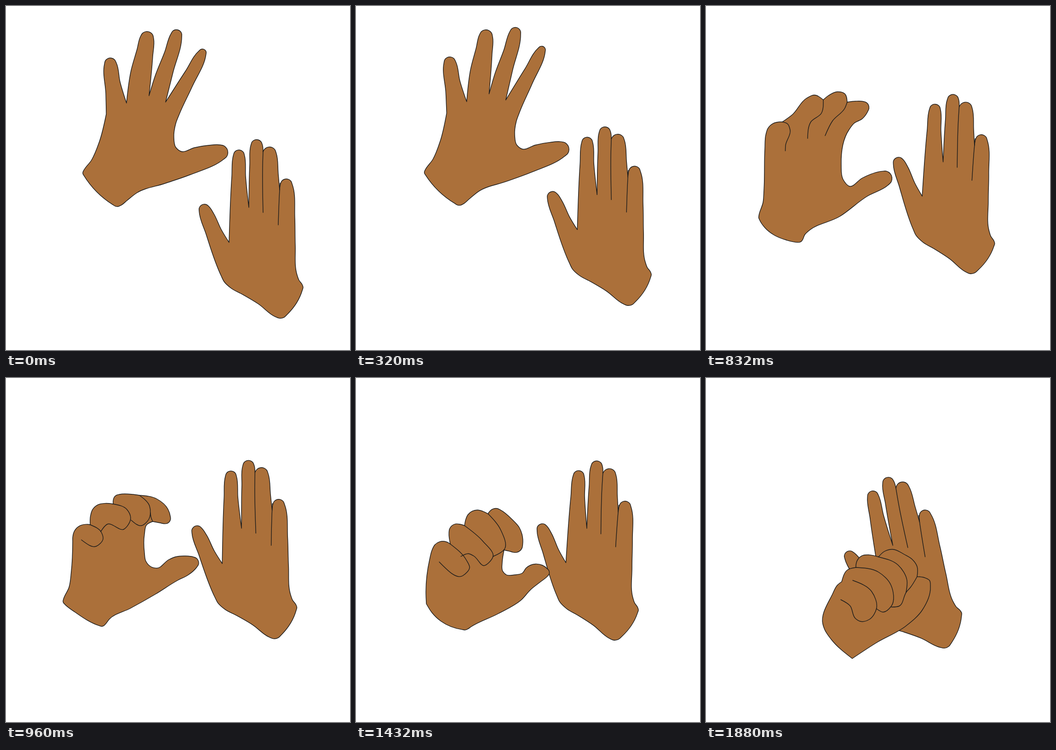
An HTML page with a canvas for the animation above (2.16 s loop, 748x748 px).

```html
<!DOCTYPE html>
<html lang="en">
<head>
<meta charset="utf-8">
<title>Two hands</title>
<style>
  html, body { margin: 0; width: 100%; height: 100%; overflow: hidden; background: #fff; }
  canvas { display: block; width: 100vw; height: 100vh; }
</style>
</head>
<body>
<canvas id="stage" width="748" height="748"></canvas>
<script>
const SKIN = '#ab703a', INK = '#1b1b1b';
const ctx = document.getElementById('stage').getContext('2d');

// Adds a smooth curve through the points, spaced by chord length.
function spline(path, pts) {
  const n = pts.length - 1, len = [], dir = [], tan = [];
  for (let i = 0; i < n; i++) {
    const dx = pts[i + 1][0] - pts[i][0], dy = pts[i + 1][1] - pts[i][1];
    len[i] = Math.hypot(dx, dy) || 1;
    dir[i] = [dx / len[i], dy / len[i]];
  }
  for (let i = 1; i < n; i++) {
    const w = len[i] / (len[i - 1] + len[i]);
    tan[i] = [0, 1].map(k => dir[i - 1][k] * w + dir[i][k] * (1 - w));
  }
  const end = (d, t) => t ? [0, 1].map(k => 1.5 * d[k] - 0.5 * t[k]) : d;
  tan[0] = end(dir[0], tan[1]);
  tan[n] = end(dir[n - 1], n > 1 ? tan[n - 1] : null);
  for (let i = 0; i < n; i++) {
    const h = len[i] / 3, [a, b] = [pts[i], pts[i + 1]], [s, t] = [tan[i], tan[i + 1]];
    path.bezierCurveTo(a[0] + s[0] * h, a[1] + s[1] * h, b[0] - t[0] * h, b[1] - t[1] * h, b[0], b[1]);
  }
}

// Angle on circle c where a line to q (a point or another circle) touches it.
function touch(c, q, side) {
  const dx = q[0] - c[0], dy = q[1] - c[1];
  const reach = (c[2] - (q[2] || 0)) / Math.hypot(dx, dy);
  return Math.atan2(dy, dx) + side * Math.acos(Math.min(1, reach));
}

// Clockwise arc of a round tip, fitted to its neighbours.
function roundTip(c, prev, next) {
  const from = touch(c, prev, 1), full = 2 * Math.PI;
  const sweep = ((touch(c, next, -1) - from) % full + full) % full;
  const steps = Math.ceil(sweep / 0.6);
  return Array.from({ length: steps + 1 }, (_, i) => {
    const a = from + sweep * i / steps;
    return [c[0] + c[2] * Math.cos(a), c[1] + c[2] * Math.sin(a)];
  });
}

// "x,y" is a point, "x,y,r" a round tip, and a bar marks a sharp corner.
function trace(text, closed) {
  const path = new Path2D();
  const runs = text.split('|').map(r => r.trim().split(/\s+/).map(p => p.split(',').map(Number)));
  const keys = runs.flat(), n = keys.length;
  let at = 0, last = null;
  path.moveTo(...keys[0]);
  runs.forEach((run, i) => {
    const pts = last ? [last] : [];
    for (const key of run) {
      if (key.length > 2) pts.push(...roundTip(key, keys[(at + n - 1) % n], keys[(at + 1) % n]));
      else pts.push(key);
      at++;
    }
    if (closed && i === runs.length - 1) pts.push(keys[0]);
    spline(path, pts);
    last = pts[pts.length - 1];
  });
  if (closed) path.closePath();
  return path;
}

function hand(outline, ...creases) {
  return { shape: trace(outline, true), creases: creases.map(c => trace(c, false)) };
}

const flat = hand(
  `485,514 491,370 506.5,325,12 521,370 528,438 | 530,345 545,303,12.5 559,317 |
   573,321,14.5 592,365 595,400 | 609.5,389,13 628,460 629,520 633,585 637,596
   635,612,11 596,660,19 549,648 514,627 490,614 474,599 468,587 435,496
   431.5,443,12 452,452 468,486`,
  '559,315 558,350 559,449',
  '596,385 595,400 592,476');

const spread = hand(
  `262,211 272,140 285,94 306.5,70,14.5 319,110 311,195 | 325,150 345,100 370.5,63.5,12
   363,145 347,209 | 390,142 427,102,8.5 405,175 377,235 369,256 365,285 369,307 380,316
   410,308 440,303 466,318.5,16.5 400,367 345,386 285,406 263,423 242,422,14 174.5,363,7.5
   186,335 203,295 218,235 | 217,190 227,126,13 248,165`);

const bent = hand(
  `166,252 188,236 218,201 235,193.5 255,204 | 266,195 285,186.5 302,191 307,209 |
   325,207 341,221,13.5 340,245 322,255 311,269 294,345 298,377 312,392 340,374
   388,375,16.5 350,414 290,458 222,490 215,497 201,504,10 175,509 148,498 128,482
   124,459,9.5 124,427 126,400 128,310 160,282,30`,
  '166,252 177,256 183,270 173,303 172.5,315',
  '255,204 251,233 228,252 221,288',
  '307,209 302,222 275,250 259,282');

const curled = hand(
  `183,319 213,302,29.5 233,274 | 247,267,14 275,253 290,255 |
   328,263 352,285 346,305,12 335,315 319,312 | 306,319 301,340 301,380 304,398 313,409
   328,413.5 354,395 368,389 390,387 406,402,13 395,429 375,439 325,470 270,501
   225,524 208,531,9 150,509 132,485,8 137,455 142,420 145,355 174,347,29`,
  '183,319 207,335 211,350 196,366 164,352',
  '233,274 263,286 271,304 256,329 220,318 206,334',
  '290,255 312,278 310,308 294,321 272,309',
  '314,293 316,305 319,312');

const cupped = hand(
  `205,361 220,335,18 236,321 | 264,313,26 288,296 |
   304,300,16.5 340,308 355,325 361,340 346,363,16.5 335,377 322,374 |
   318,400 319,420 327,428 345,428 362,424 370,413 390,404.5 405,407 411,423,9.5
   400,444 380,460 360,482 310,512 250,541 236,536,12 185,529 165,510 153,491 |
   152,465 160,395 189,379,24`,
  '205,361 240,396 247,412 232,430 181,400',
  '236,321 275,354 298,388 278,408 256,387 245,382 228,388',
  '288,296 315,331 324,370 298,388');

const fist = hand(
  `262,376 270,366 285,360 316,354 | 334,354,17 351,339 |
   360,333 375,333 393,343 402,375 400,403 409,412 |
   420,407 436,415,13.5 448,425 443,440 430,455 395,487 345,521 325,533 305,549
   262,582,8 202,523,10 204,505 208,490 221,410 | 230,393 245,384`,
  '262,376 296,415 305,462 288,480 272,477 255,455 234,441',
  '316,354 340,406 347,428 325,454 304,442',
  '351,339 375,383 377,425 360,435 347,431',
  '400,400 399,411 392,416 380,412',
  '409,412 393,430 373,457');

const turned = hand(
  `295,443 308,417 326,412 | 350,408,24 375,389 |
   388,377 405,372.5 432,384 448,394 459,410 459,432 |
   475,434 486,440 488,455 470,505 435,539 370,576 318,610 |
   272,568 258,547 254,535 275,470 286,450`,
  '326,412 375,422 402,450 403,496 385,509 371,502',
  '375,389 418,407 437,440 435,466',
  '459,432 444,456 436,465 420,496 403,498',
  '319,440 360,464 371,500 355,525 335,529 325,523 313,495 293,482');

// Pivots: where each hand is pinned, in its own drawing.
const FLAT_PIN = [485, 514], LEFT_PIN = [242, 436];

// right: pin x, pin y, turn in degrees; move: the same for the left hand.
const poses = [
  { ms: 320, left: spread, right: [485, 514, 0] },
  { ms: 320, left: spread, move: [225, 433.4, -1.1], right: [481.2, 486.3, 0] },
  { ms: 320, left: bent, right: [470.1, 413.6, 1.9] },
  { ms: 280, left: curled, right: [470.2, 403.5, -0.8] },
  { ms: 320, left: cupped, right: [456.4, 401.6, 1.9] },
  { ms: 320, left: fist, right: [417.6, 382.7, -0.3] },
  { ms: 280, left: turned, right: [379, 447, -11.3] }
];
const LOOP = poses.reduce((sum, p) => sum + p.ms, 0);

function drawHand({ shape, creases }, pin, [x, y, deg]) {
  ctx.save();
  ctx.translate(x, y);
  ctx.rotate(deg * Math.PI / 180);
  ctx.translate(-pin[0], -pin[1]);
  ctx.fill(shape);
  ctx.stroke(shape);
  creases.forEach(c => ctx.stroke(c));
  ctx.restore();
}

function poseAt(ms) {
  let t = ms % LOOP;
  for (const pose of poses) {
    if (t < pose.ms) return pose;
    t -= pose.ms;
  }
  return poses[0];
}

function draw(pose) {
  ctx.fillStyle = '#fff';
  ctx.fillRect(0, 0, 748, 748);
  ctx.fillStyle = SKIN;
  ctx.strokeStyle = INK;
  ctx.lineWidth = 1.4;
  ctx.lineJoin = ctx.lineCap = 'round';
  drawHand(flat, FLAT_PIN, pose.right);
  drawHand(pose.left, LEFT_PIN, pose.move || [...LEFT_PIN, 0]);
}

const start = performance.now();
function tick() {
  draw(poseAt(performance.now() - start));
  requestAnimationFrame(tick);
}
tick();
</script>
</body>
</html>
```
